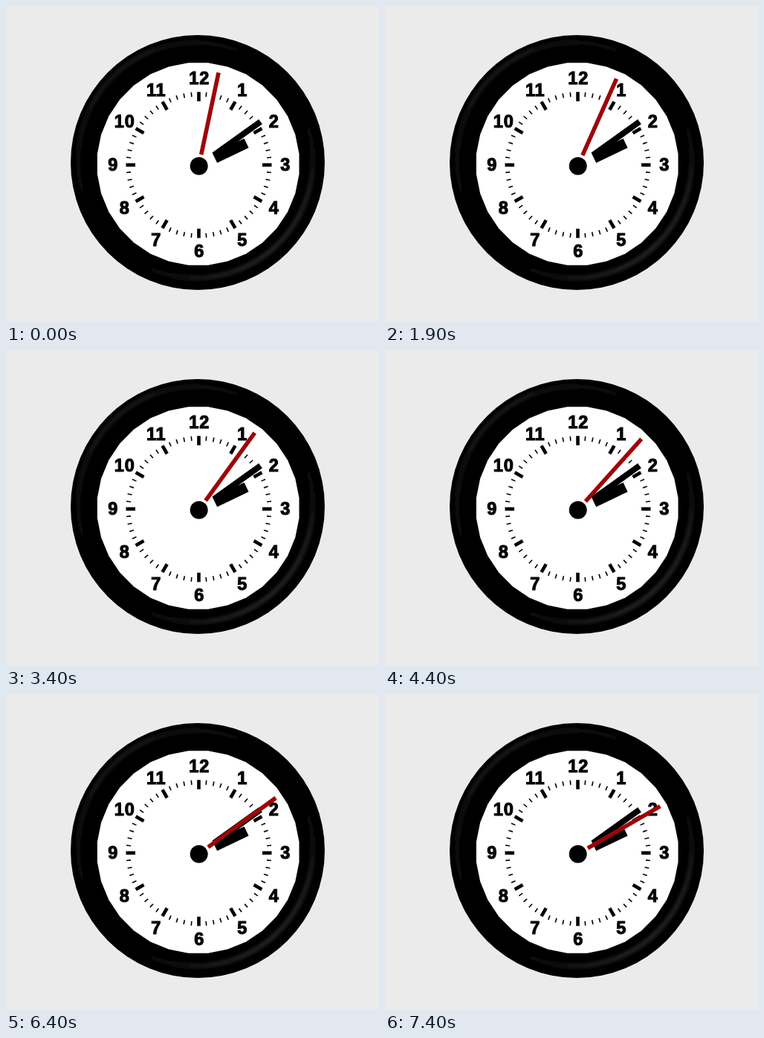
Write an HTML page that moves like this. It is 502x424 px and loops after 8000 ms.

```html
<!DOCTYPE html>
<html lang="en">
<head>
<meta charset="utf-8">
<title>Wall clock</title>
<style>
html, body { margin: 0; width: 100%; height: 100%; overflow: hidden; background: #ebebeb; }
svg { display: block; width: 100vw; height: 100vh; }
text {
  font: 700 23.5px "Liberation Sans", Arial, sans-serif;
  letter-spacing: .8px;
  text-anchor: middle;
  fill: #050505;
  stroke: #050505;
  stroke-width: 1.1;
}
</style>
</head>
<body>
<svg viewBox="0 0 502 424">
  <defs>
    <filter id="soft" x="-20%" y="-20%" width="140%" height="140%"><feGaussianBlur stdDeviation="2.5"/></filter>
    <filter id="lens" filterUnits="userSpaceOnUse" x="0" y="0" width="502" height="424" color-interpolation-filters="sRGB">
      <feGaussianBlur stdDeviation=".45"/>
    </filter>
    <linearGradient id="sheen" gradientUnits="userSpaceOnUse" x1="150" y1="90" x2="366" y2="330">
      <stop offset="0" stop-color="#1c1c1c"/>
      <stop offset=".35" stop-color="#000"/>
      <stop offset=".65" stop-color="#000"/>
      <stop offset="1" stop-color="#303030"/>
    </linearGradient>
  </defs>
  <rect width="502" height="424" fill="#ebebeb"/>
  <g filter="url(#lens)">
    <circle cx="258" cy="210" r="171"/>
    <circle cx="255" cy="207" r="158" fill="none" stroke="url(#sheen)" stroke-width="5" filter="url(#soft)"/>
    <polygon id="dial" fill="#fff"/>
    <g id="ticks" stroke="#000"></g>
    <g id="digits"></g>
    <g transform="translate(259.5 214.6)">
      <rect x="-7" y="-71" width="14" height="47" transform="rotate(64.5)"/>
      <rect x="-4" y="-102" width="8" height="77" transform="rotate(54.5)"/>
      <rect id="second" x="-2.8" y="-128" width="5.6" height="112.5" fill="#9e0508"/>
    </g>
    <circle cx="259.7" cy="214.7" r="12"/>
  </g>
</svg>
<script>
const LOOP = 8000, SIDES = 32, CX = 259.5, CY = 213.3;
const NS = "http://www.w3.org/2000/svg";
const $ = id => document.getElementById(id);
const polar = (cx, cy, r, deg) => {
  const a = deg * Math.PI / 180;
  return [cx + r * Math.sin(a), cy - r * Math.cos(a)];
};
const add = (parent, tag, attrs) => {
  const el = document.createElementNS(NS, tag);
  for (const k in attrs) el.setAttribute(k, attrs[k]);
  return parent.appendChild(el);
};

$("dial").setAttribute("points",
  Array.from({ length: SIDES }, (_, i) => polar(258.7, 212, 136.5, (i + .5) * 360 / SIDES)).join(" "));

for (let i = 0; i < 60; i++) {
  const hour = i % 5 === 0;
  const [x1, y1] = polar(CX, CY, hour ? 85.5 : 92, i * 6);
  const [x2, y2] = polar(CX, CY, 98, i * 6);
  add($("ticks"), "line", { x1, y1, x2, y2, "stroke-width": hour ? 4.6 : 1.6 });
}

for (let h = 1; h <= 12; h++) {
  const [x, y] = polar(CX, CY, 116, h * 30);
  add($("digits"), "text", { x: x + .7, y: y + 8 }).textContent = h;
}

// The hand ticks once a second, after a late jump from 2 to 4.
const seconds = t => t < 1900 ? 2 : 4 + Math.max(0, Math.floor((t - 1400) / 1000));

function draw(t) {
  $("second").setAttribute("transform", `rotate(${seconds(t % LOOP) * 6})`);
}

const start = performance.now();
function frame() {
  draw(performance.now() - start);
  requestAnimationFrame(frame);
}
draw(0);
requestAnimationFrame(frame);
</script>
</body>
</html>
```
